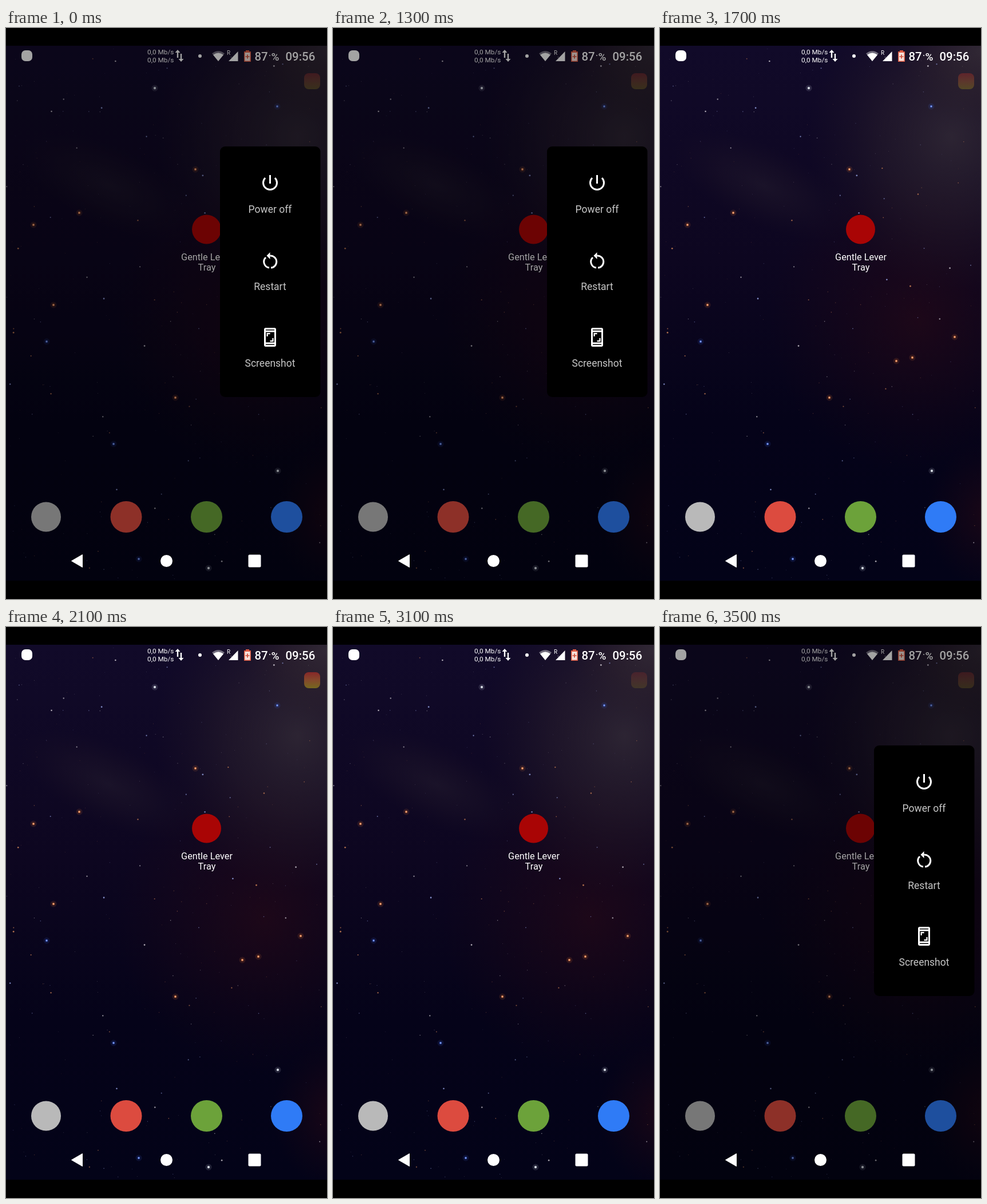
An HTML page for the animation above (3.6 s loop, 561x998 px).

```html
<!DOCTYPE html>
<html lang="en">
<head>
<meta charset="utf-8">
<title>Power menu</title>
<style>
html, body { margin: 0; width: 100%; height: 100%; overflow: hidden; background: #000; }
svg { display: block; width: 561px; height: 998px; font-family: Roboto, sans-serif; fill: #fff; }
.label { font-size: 16.3px; text-anchor: middle; }
.rate { font-size: 11.8px; }
.status { font-size: 20.4px; font-weight: 500; }
.item { font-size: 17.5px; text-anchor: middle; fill: #c6c6c6; }
.line { fill: none; stroke: #fff; stroke-width: 3; }
</style>
</head>
<body>
<svg viewBox="0 0 561 998">
  <defs>
    <linearGradient id="sky" x2="0" y2="1">
      <stop offset="0" stop-color="#110a29"/>
      <stop offset=".4" stop-color="#0d0620"/>
      <stop offset=".7" stop-color="#050319"/>
      <stop offset="1" stop-color="#030318"/>
    </linearGradient>
    <radialGradient id="dust">
      <stop stop-color="#3c333a" stop-opacity=".65"/>
      <stop offset=".5" stop-color="#33272f" stop-opacity=".4"/>
      <stop offset="1" stop-color="#281c26" stop-opacity="0"/>
    </radialGradient>
    <radialGradient id="ember">
      <stop stop-color="#2c0a15" stop-opacity=".55"/>
      <stop offset="1" stop-color="#220814" stop-opacity="0"/>
    </radialGradient>
    <linearGradient id="warm" x2="0" y2="1">
      <stop offset="0" stop-color="#c02c24"/>
      <stop offset=".5" stop-color="#bd622a"/>
      <stop offset="1" stop-color="#a49516"/>
    </linearGradient>
    <clipPath id="screen"><path d="M0 31H561V966H0Z"/></clipPath>
  </defs>

  <g clip-path="url(#screen)">
    <path fill="url(#sky)" d="M0 31H561V966H0Z"/>
    <g fill="url(#ember)">
      <ellipse cx="450" cy="510" rx="260" ry="270"/>
      <ellipse cx="575" cy="850" rx="110" ry="130"/>
    </g>
    <g fill="url(#dust)">
      <ellipse cx="510" cy="190" rx="250" ry="270"/>
      <ellipse cx="561" cy="40" rx="150" ry="130"/>
      <ellipse cx="180" cy="275" rx="170" ry="70" transform="rotate(25 180 275)" opacity=".4"/>
    </g>
    <g id="stars"></g>
  </g>

  <rect x="27" y="39" width="19" height="19" rx="7"/>
  <text class="rate" x="247" y="46">0,0 Mb/s</text>
  <text class="rate" x="247" y="60">0,0 Mb/s</text>
  <path d="M300 38l4.500 5h-3.300v9h-2.400v-9h-3.300zM306 59l4.500-5h-3.300v-9h-2.400v9h-3.300z"/>
  <circle cx="339" cy="49" r="3"/>
  <path d="M371 58L360 44.500Q371 36 382 44.500Z" opacity=".4"/>
  <path d="M371 58L362 47Q371 40 380 47Z"/>
  <text x="386" y="47" font-size="10">R</text>
  <path d="M389 58H405.500V41Z"/>
  <path d="M419 39h6v2h3v18h-12V41h3z" fill="#dc5a43"/>
  <path d="M417.500 43h9v14.500h-9z" fill="#f7e2dc"/>
  <path d="M422 46.500v7M418.500 50h7" stroke="#cf4d38" stroke-width="1.700"/>
  <text class="status" x="434.500" y="57">87</text>
  <circle cx="461" cy="48" r="1"/>
  <text class="status" x="463.500" y="57" style="font-size:19px">%</text>
  <text class="status" x="488.500" y="57">09:56</text>

  <circle cx="350.500" cy="352" r="25.500" fill="#a90505"/>
  <text class="label" x="351" y="406">Gentle Lever</text>
  <text class="label" x="351" y="424">Tray</text>
  <circle cx="70" cy="854.500" r="26" fill="#b9b9b9"/>
  <circle cx="210" cy="854.500" r="27.500" fill="#dc4b3f"/>
  <circle cx="350.500" cy="854.500" r="27.500" fill="#6ca23a"/>
  <circle cx="490.500" cy="854.500" r="27.500" fill="#2f7bf6"/>

  <g id="menu">
    <path d="M0 31H561V966H0Z" fill="#000" opacity=".36"/>
    <rect x="374" y="207" width="175.500" height="438" rx="9" fill="#000"/>
    <path class="line" d="M453 262A12 12 0 1 0 470 262M461.500 257v15"/>
    <path class="line" d="M461.500 398A10.500 10.500 0 0 1 463 419M460 419A10.500 10.500 0 0 1 454 401"/>
    <path d="M461.500 392v12l-6-6z"/>
    <rect class="line" x="452.500" y="525.500" width="18" height="30" rx="1.500"/>
    <path class="line" d="M454 530h15M454 551h15"/>
    <path class="line" style="stroke-width:2.250px" d="M456.600 539v-5h5M461.500 547h5v-5"/>
    <text class="item" x="461.500" y="323">Power off</text>
    <text class="item" x="461.500" y="457.500">Restart</text>
    <text class="item" x="461.500" y="592">Screenshot</text>
  </g>

  <rect id="pulse" x="521" y="79" width="28" height="28" rx="8" fill="url(#warm)"/>
  <path d="M114.500 931.500L133.500 920.500V942.500Z" stroke="#fff" stroke-linejoin="round"/>
  <circle cx="280.500" cy="931.500" r="10.500"/>
  <rect x="423.500" y="920.500" width="22" height="22" rx="2"/>
</svg>
<script>
const byId = id => document.getElementById(id);
const stars = byId('stars'), menu = byId('menu'), pulse = byId('pulse');

function dot(cx, cy, r, fill, opacity) {
  const c = document.createElementNS('http://www.w3.org/2000/svg', 'circle');
  Object.entries({ cx, cy, r, fill, opacity }).forEach(([k, v]) => c.setAttribute(k, v));
  stars.append(c);
}

function brightStar(x, y, color) {
  dot(x, y, 5.5, color, .14);
  dot(x, y, 2.2, color, .85);
  dot(x, y, 1, '#fff', .6);
}

let seed = 41;
const rand = () => (seed = seed * 16807 % 2147483647) / 2147483647;

// Mostly faint stars, a few larger ones
const tints = ['#8f9bd8', '#c9c4cc', '#c07a52'];
for (let i = 0; i < 260; i++) {
  const size = rand() ** 4;
  dot(rand() * 561, 31 + rand() * 935, .45 + size, tints[i % 3], .3 + .5 * size + .2 * rand());
}

// The stars that stand out
[[83, 484], [296, 646], [441, 576], [515, 540], [413, 582], [48, 344], [128, 323], [331, 247]]
  .forEach(p => brightStar(...p, '#e0783c'));
[[71, 548], [188, 727], [474, 137], [232, 928]].forEach(p => brightStar(...p, '#3f66d8'));
[[260, 105], [354, 944], [475, 774]].forEach(p => brightStar(...p, '#dfe6ee'));

// Two slow pulses, then a rest until the loop starts again
const glow = t => .2 + .42 * Math.sin(Math.PI * Math.min(t + 100, 3000) / 1500) ** 2;

function draw(now) {
  const t = Math.floor(now % 3600 / 100) * 100;
  menu.style.display = t < 1400 || t >= 3300 ? '' : 'none';
  pulse.setAttribute('opacity', glow(t));
  requestAnimationFrame(draw);
}
draw(performance.now());
</script>
</body>
</html>
```
